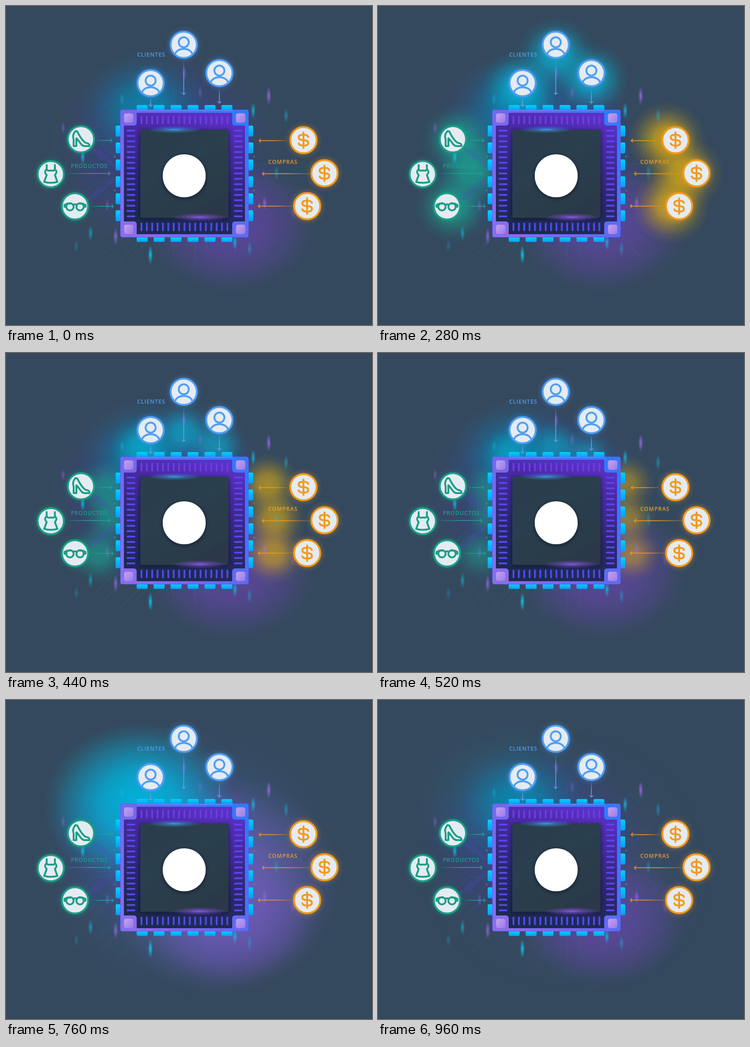
Write an HTML page that moves like this. It is 801 by 699 pixels and loops after 1000 ms.

```html
<!DOCTYPE html>
<html lang="es">
<head>
<meta charset="utf-8">
<title>Datos</title>
<style>
html, body { margin: 0; width: 100%; height: 100%; overflow: hidden; background: #35495e; }
svg { display: block; width: 801px; height: 699px; }
text { font: 600 12px "Open Sans", "Noto Sans", sans-serif; letter-spacing: 1px; }
.blob { transform-box: fill-box; transform-origin: center; animation: fade 1s infinite, move 1s infinite; }
.blob.fast { animation-name: fade, rush; }
#pulse { animation: pulse 1s infinite; }

/* every segment advances in 40 ms steps */
@keyframes fade {
  0% { opacity: 0; animation-timing-function: steps(3); }
  12% { opacity: .5; animation-timing-function: steps(4); }
  28% { opacity: .95; animation-timing-function: steps(2); }
  36% { opacity: .92; animation-timing-function: steps(4); }
  52% { opacity: .6; animation-timing-function: steps(2); }
  60%, 100% { opacity: 0; }
}
@keyframes move {
  0% { transform: none; animation-timing-function: steps(3); }
  12% { transform: translate(calc(var(--x) * .03), calc(var(--y) * .03)); animation-timing-function: steps(4); }
  28% { transform: translate(calc(var(--x) * .18), calc(var(--y) * .18)) scale(.92); animation-timing-function: steps(2); }
  36% { transform: translate(calc(var(--x) * .45), calc(var(--y) * .45)) scale(.82); animation-timing-function: steps(4); }
  52%, 100% { transform: translate(var(--x), var(--y)) scale(.7); }
}
@keyframes rush {
  0% { transform: none; animation-timing-function: steps(3); }
  12% { transform: translate(calc(var(--x) * .33), calc(var(--y) * .33)); animation-timing-function: steps(4); }
  28% { transform: translate(calc(var(--x) * .75), calc(var(--y) * .75)) scale(.92); animation-timing-function: steps(6); }
  52%, 100% { transform: translate(var(--x), var(--y)) scale(.6); }
}
@keyframes pulse {
  0%, 56% { opacity: 0; animation-timing-function: steps(5); }
  76% { opacity: 1; animation-timing-function: steps(5); }
  96% { opacity: .14; animation-timing-function: steps(1); }
  100% { opacity: 0; }
}
</style>
</head>
<body>
<svg viewBox="0 0 801 699">
  <defs id="defs">
    <linearGradient id="frame" x1="0" y1=".8" x2="1" y2=".2">
      <stop stop-color="#8b6cec"/><stop offset=".5" stop-color="#6c66f0"/><stop offset="1" stop-color="#2f7bfa"/>
    </linearGradient>
    <linearGradient id="well" x1=".65" y1="0" x2=".4" y2="1">
      <stop stop-color="#5c30c6"/><stop offset=".2" stop-color="#4a2aa6"/>
      <stop offset=".6" stop-color="#2b286f"/><stop offset="1" stop-color="#1b2a4c"/>
    </linearGradient>
    <linearGradient id="core" x1="0" y1="0" x2=".6" y2="1">
      <stop stop-color="#2c3d4d"/><stop offset=".5" stop-color="#2c3f4f"/><stop offset="1" stop-color="#293948"/>
    </linearGradient>
    <linearGradient id="pin" x2="0" y2="1">
      <stop stop-color="#00d2fa"/><stop offset="1" stop-color="#0a9df5"/>
    </linearGradient>
    <linearGradient id="stud" x2="1" y2="1">
      <stop stop-color="#c3a4f4"/><stop offset="1" stop-color="#9c7ce6"/>
    </linearGradient>
    <filter id="shade" x="-30%" y="-30%" width="160%" height="160%">
      <feDropShadow dx="0" dy="2" stdDeviation="5" flood-color="#0b1322" flood-opacity=".6"/>
    </filter>
    <g id="user">
      <circle cy="-5.5" r="11"/>
      <path d="M-19 21C-15 5 15 5 19 21"/>
    </g>
    <path id="dollar" d="M0-17V17M10.5-7C9.5-11 6-12 0-12C-7-12-10.5-10-10.5-6.2C-10.5-1.5-6 0 0 0C6 0 10.5 1.5 10.5 6.2C10.5 11 6 12 0 12C-6 12-9.5 11-10.5 7"/>
    <path id="shoe" d="M-12-18C-18-11-18-5-16 0V15H-10V-2C-4 2 0 15 8 15H18.500C19.500 10 16 9 11 8C4 5-3-7-8-17Z"/>
    <path id="top" d="M-9-20V-11C-15-5-12-2-9 2L-14.500 17C-5 19.500 5 19.500 14.500 17L9 2C12-2 15-5 9-11V-20M-9-11C-7-6-4-8 0-8C4-8 7-6 9-11"/>
    <g id="glasses">
      <circle cx="-11" cy="1" r="8"/><circle cx="11" cy="1" r="8"/>
      <path d="M-4-3C-2-5 2-5 4-3M-23-3L-17-6H-10M23-3L17-6H10M-23-3V1H-19M23-3V1H19"/>
    </g>
  </defs>

  <rect width="801" height="699" fill="#35495e"/>
  <g id="aura"></g>
  <g id="pulse"></g>
  <g id="blobs"></g>
  <g fill="none" stroke="#2d8ba0" stroke-opacity=".25">
    <path d="M238 330L170 262M240 347H180L148 315M240 387H197L165 419M238 404L184 458M240 425L190 475M240 480L195 525M250 507L205 552M290 517L245 562M308 517L280 545"/>
    <path d="M543 330L613 260M541 347H604M541 387H585L617 419M543 404L592 453M541 470L588 517M531 505L575 549M541 250L575 216"/>
    <path d="M367 517V567M414 517V567M367 217V180M414 217V180M250 250L215 215M265 227L240 202M440 517V550L455 565"/>
  </g>
  <g fill="none" stroke="#5548c8" stroke-opacity=".2" stroke-width="8">
    <path d="M238 352L200 314M212 335L175 298M236 378L192 422M208 397L168 437"/>
  </g>
  <g fill="#4b8ba8" fill-opacity=".65">
    <circle cx="238" cy="330" r="2"/><circle cx="238" cy="404" r="2"/>
    <circle cx="543" cy="330" r="2"/><circle cx="543" cy="404" r="2"/>
  </g>
  <g id="sparks"></g>

  <g id="pins" fill="url(#pin)"></g>
  <rect x="250.500" y="227.500" width="280" height="279" rx="4" fill="url(#frame)" stroke="#5560fa"/>
  <path d="M286 228.500H496" stroke="#5a9aff" stroke-width="1.500"/>
  <path d="M286 234H495V256a6 6 0 0 0 6 6H523V472H501a6 6 0 0 0-6 6V500H286V478a6 6 0 0 0-6-6H258V262H280a6 6 0 0 0 6-6Z" fill="url(#well)"/>
  <g id="studs" fill="url(#stud)" stroke="#8769da" stroke-opacity=".6"></g>
  <g id="dashes" stroke-width="4" stroke-linecap="round"></g>
  <rect x="294" y="271" width="193" height="193" rx="3" fill="url(#core)" filter="url(#shade)"/>
  <g id="shine"></g>
  <circle cx="390" cy="372" r="47" fill="#fff" filter="url(#shade)"/>

  <g id="arrows"></g>
  <text x="287" y="111" fill="#4b9ff5">CLIENTES</text>
  <text x="142" y="355" fill="#1d9e86" style="letter-spacing:.9px">PRODUCTOS</text>
  <text x="574" y="346" fill="#e59c27">COMPRAS</text>
  <g id="icons"></g>
</svg>
<script>
const BLUE = '#4f9ff5', GREEN = '#1a9e86', ORANGE = '#f39a1c';
const add = (id, html) => document.getElementById(id).insertAdjacentHTML('beforeend', html);

// radial fill; stops are pairs of offset and opacity
function radial(id, color, ...stops) {
  add('defs', `<radialGradient id="${id}">` + stops.map(([o, a]) =>
    `<stop offset="${o}" stop-color="${color}" stop-opacity="${a}"/>`).join('') + '</radialGradient>');
}
const soft = (id, color, a) =>
  radial(id, color, [0, a], [.3, a * .84], [.55, a * .43], [.78, a * .13], [1, 0]);
const broad = (id, color, a) =>
  radial(id, color, [0, a], [.4, a * .8], [.7, a * .42], [.88, a * .13], [1, 0]);
const oval = (layer, fill, x, y, rx, ry = rx, extra = '') =>
  add(layer, `<ellipse cx="${x}" cy="${y}" rx="${rx}" ry="${ry}" fill="url(#${fill})" ${extra}/>`);

// standing light behind the chip
broad('wash', '#3c3c9c', .55);
soft('teal', '#0092b4', .75);
broad('plum', '#6844b0', .72);
oval('aura', 'wash', 345, 315, 250, 218);
oval('aura', 'plum', 492, 478, 185, 150);
oval('aura', 'teal', 303, 228, 145, 128);

// burst after the lights have entered
broad('cyan', '#00b8de', .88);
broad('violet', '#7a62c4', .72);
broad('indigo', '#40609a', .5);
oval('pulse', 'indigo', 400, 350, 330, 297);
oval('pulse', 'violet', 475, 405, 255, 240);
oval('pulse', 'cyan', 290, 228, 208, 180);

// icon, place, colour, light's destination
const nodes = [
  ['user', 389, 85, BLUE, 389, 205], ['user', 316.5, 169, BLUE, 288, 222], ['user', 467, 147, BLUE, 456, 225],
  ['shoe', 164, 292, GREEN, 242, 300], ['top', 98, 368.500, GREEN, 242, 358], ['glasses', 151, 439, GREEN, 224, 440],
  ['dollar', 651, 294, ORANGE, 542, 285], ['dollar', 697, 366.500, ORANGE, 545, 362], ['dollar', 659, 438.500, ORANGE, 556, 440],
];
const glow = { [BLUE]: 'lightB', [GREEN]: 'lightG', [ORANGE]: 'lightO' };
soft('lightB', '#08b4d6', .85);
soft('lightG', '#18aa92', .8);
soft('lightO', '#e0ae12', .86);
for (const c in glow) radial('halo' + glow[c], c, [.7, .28], [.85, .08], [1, 0]);

for (const [icon, x, y, color, tx, ty] of nodes) {
  oval('blobs', glow[color], x, y, 96, 92,
    `class="blob${icon == 'top' ? ' fast' : ''}" style="--x:${tx - x}px;--y:${ty - y}px"`);
  oval('icons', 'halo' + glow[color], x, y, 42);
  add('icons', `<g transform="translate(${x} ${y})" fill="none" stroke="${color}" stroke-width="4" stroke-linecap="round" stroke-linejoin="round">
    <circle r="28.700" fill="#e5ebf2"/><use href="#${icon}"/></g>`);
}

// tail x, y, angle, length, colour
[[389, 122, 90, 72, '#719bef'], [316.500, 202, 90, 18, '#719bef'], [467, 182, 90, 31, '#719bef'],
 [198, 294.500, 0, 34, '#23a28e'], [136, 367, 0, 92, '#23a28e'], [189, 439, 0, 46, '#23a28e'],
 [615, 295, 180, 61, ORANGE], [666, 367.500, 180, 105, ORANGE], [627, 438.500, 180, 75, ORANGE]
].forEach(([x, y, angle, len, color], i) => {
  add('defs', `<linearGradient id="tail${i}"><stop stop-color="${color}" stop-opacity=".25"/>
    <stop offset=".5" stop-color="${color}"/></linearGradient>`);
  add('arrows', `<g transform="translate(${x} ${y}) rotate(${angle})">
    <rect y="-.8" width="${len}" height="1.600" fill="url(#tail${i})"/>
    <path d="M${len - 4}-4L${len} 0L${len - 4} 4" fill="none" stroke="${color}" stroke-width="1.500"/></g>`);
});

for (let i = 0; i < 6; i++) {
  const p = i * 37.1;
  for (const y of [217, 506]) add('pins', `<rect x="${286 + p}" y="${y}" width="24" height="11" rx="2.500"/>`);
  for (const x of [240, 530]) add('pins', `<rect x="${x}" y="${262 + p}" width="11" height="24" rx="2.500"/>`);
}
for (const x of [258, 503]) for (const y of [235, 479])
  add('studs', `<rect x="${x}" y="${y}" width="21" height="21" rx="5"/>`);

for (let i = 0; i < 17; i++) {
  const p = i * 11.75;
  add('dashes', `<path d="M${296.500 + p} 242.500v15" stroke="#6a3de2"/>
    <path d="M${296.500 + p} 476.500v15" stroke="#5148ee"/>
    <path d="M266 ${273 + p}h15" stroke="#5748ea"/><path d="M501 ${273 + p}h15" stroke="#5c44e8"/>`);
}

radial('shineB', '#3fb4ff', [0, .8], [.4, .35], [1, 0]);
radial('shineV', '#9a5cff', [0, .85], [.4, .4], [1, 0]);
oval('shine', 'shineB', 368, 271, 60, 8);
oval('shine', 'shineV', 424, 463, 62, 9);

radial('sparkC', '#0fc8ee', [0, 1], [.35, .6], [1, 0]);
radial('sparkV', '#9d6cf2', [0, 1], [.35, .6], [1, 0]);
[['V', 575, 197, 20, .9], ['C', 541, 229, 18, .8], ['C', 613, 240, 17, .5], ['V', 425, 190, 15, .4],
 ['C', 254, 204, 14, .4], ['V', 125, 267, 14, .45], ['C', 168, 330, 18, .85], ['C', 185, 498, 18, .6],
 ['C', 154, 526, 14, .3], ['V', 240, 505, 20, .8], ['C', 316, 545, 21, 1], ['C', 501, 518, 18, .75],
 ['C', 533, 532, 17, .45], ['V', 566, 432, 16, .7], ['C', 592, 365, 17, .4], ['V', 390, 148, 16, .5],
 ['V', 222, 437, 15, .45], ['V', 628, 455, 14, .25]
].forEach(([hue, x, y, r, a]) => oval('sparks', 'spark' + hue, x, y, 5.5, r, `opacity="${a}"`));
</script>
</body>
</html>
```
